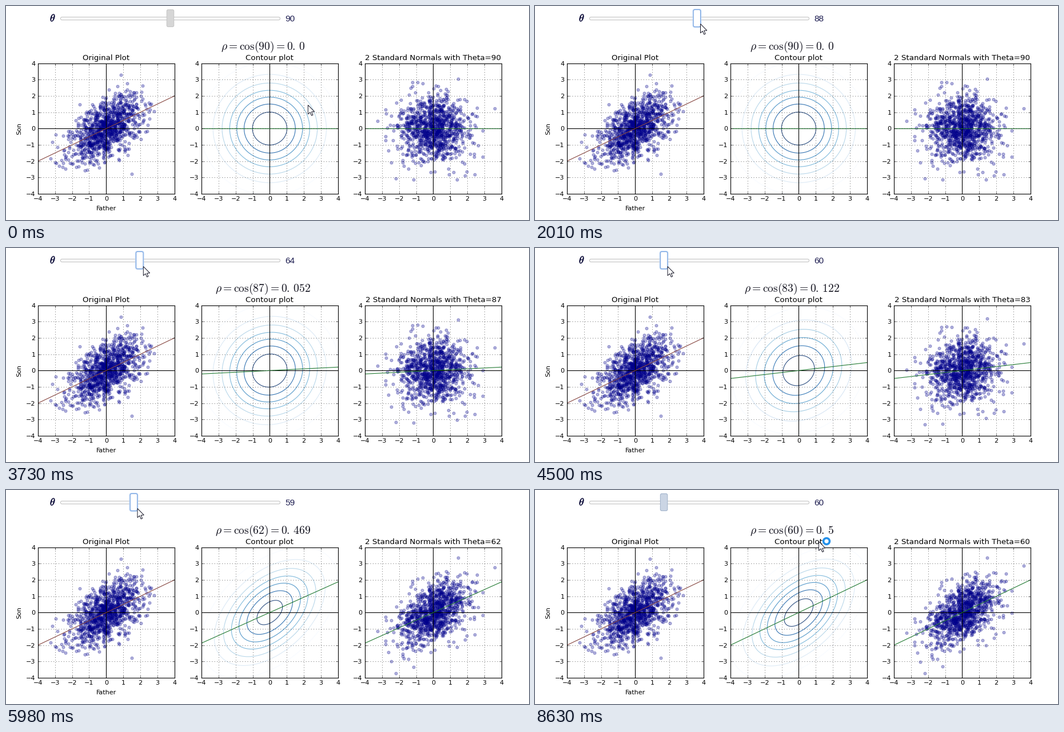
These frames come from a looping animation (915x376 px, 8.71 s). A matplotlib script:

```python
import numpy as np
import matplotlib.pyplot as plt
from matplotlib.animation import FuncAnimation
from matplotlib.patches import Circle, FancyBboxPatch, Polygon
from matplotlib.patheffects import withStroke

W, H, DPI = 915, 376, 80
STEP, FRAMES = 65, 134

# Events in ms
HOVER, GRAB, DRAG, NUDGE, RELEASE = 1150, 2010, 2250, 7380, 7840

# The plots lag behind the slider: one redraw per REDRAW ms
ANGLES = (90, 88, 87, 83, 78, 69, 62, 61, 59, 60)
FIRST_REDRAW, REDRAW = 2840, 630

# Pointer moves as (start, end, x, y)
HOME = (538, 182)
ARRIVE = [(20, 150, 508, 157), (330, 1230, 289, 31)]
LEAVE = [(7940, 8240, 517, 61), (8410, 8630, 496, 90)]

plt.rcParams.update({
    "font.family": "DejaVu Sans", "font.size": 10, "mathtext.fontset": "cm",
    "axes.linewidth": 1, "axes.axisbelow": False, "axes.titlesize": 12,
    "axes.titlepad": 5, "savefig.dpi": DPI,
})
for axis, far in (("xtick", "top"), ("ytick", "right")):
    plt.rcParams.update({
        f"{axis}.direction": "in", f"{axis}.{far}": True,
        f"{axis}.major.size": 4, f"{axis}.major.width": 0.5,
        f"{axis}.major.pad": 4,
    })

fig = plt.figure(figsize=(W / DPI, H / DPI), dpi=DPI, facecolor="white")


def panel(column, title=""):
    x = 56 + 286.05 * column
    ax = fig.add_axes([x / W, 1 - 329.8 / H, 238.6 / W, 229 / H])
    ax.set(xlim=(-4, 4), ylim=(-4, 4), xticks=range(-4, 5), yticks=range(-4, 5))
    ax.grid(True, color="black", lw=0.5, ls=(0, (2, 6)))
    ax.axhline(0, color="black", lw=1)
    ax.axvline(0, color="black", lw=1)
    ax.set_title(title)
    return ax


def normals(seed, n=1078):
    return np.random.default_rng(seed).standard_normal((2, n))


def correlate(x, z, rho):
    return rho * x + np.sqrt(1 - rho ** 2) * z


def cloud(ax, x, y):
    return ax.plot(x, y, "o", color="darkblue", alpha=0.3, ms=20 ** 0.5, mew=1,
                   zorder=1)[0]


ends = np.array([-4, 4])
left, middle, right = panel(0, "Original Plot"), panel(1, "Contour plot"), panel(2)

x0, z0 = normals(4)
cloud(left, x0, correlate(x0, z0, 0.5))
left.plot(ends, ends / 2, color="#86453f", lw=1)

xs, zs = normals(11)
dots = cloud(right, xs, zs)
fits = [ax.plot(ends, ends * 0, color="#227a32", lw=1)[0]
        for ax in (middle, right)]
rings = [middle.plot([], [], lw=1, alpha=0.85, zorder=1.9)[0] for _ in range(8)]

# Overlay in pixels, y downwards
ui = fig.add_axes([0, 0, 1, 1], zorder=5)
ui.set(xlim=(0, W), ylim=(H, 0))
ui.axis("off")


def rounded(x, y, w, h, r, **style):
    box = FancyBboxPatch((x, y), w, h, boxstyle=f"round,pad=0,rounding_size={r}",
                         **style)
    return ui.add_patch(box)


ui.text(175.5, 359, "Father", ha="center")
ui.text(23, 215.5, "Son", ha="center", va="center", rotation=90)
heading = ui.text(449.5, 76.5, "", size=17.6, ha="center", color="#10101c")
ui.text(77, 27, r"$\theta$", size=16.2, color="#10103c",
        path_effects=[withStroke(linewidth=0.5, foreground="#10103c")])
number = ui.text(488.5, 27, "", size=13.8, family="Liberation Sans",
                 color="#1c1c50")

rounded(95.5, 19.5, 384, 5, 2.5, fc="white", ec="#c4c4c4", lw=1)
glow = rounded(0, 5.5, 14.4, 32, 3.5, fc="none", ec="#c3d9f5", lw=1.2)
handle = rounded(0, 6.5, 12.4, 30, 2.5, lw=1)

ARROW = np.array([(0, 0), (0, 16), (3.7, 12.6), (6.2, 18.4), (8.6, 17.4),
                  (6.2, 11.8), (11.3, 11.5)])
pointer = ui.add_patch(Polygon(ARROW, fc="white", ec="#181828", lw=0.9, zorder=8))
busy = ui.add_patch(Circle((0, 0), 5.4, fc="white", ec="#2490ea", lw=3.2,
                           zorder=7))


def slider_value(t):
    if t < GRAB:
        return 90
    if t >= NUDGE:
        return 60
    slide = 58.1 + 29.9 * np.exp(-max(t - DRAG, 0) / 900)
    return max(59, round(slide))


def plotted_angle(t):
    k = (t - FIRST_REDRAW) // REDRAW + 1
    return ANGLES[min(max(k, 0), len(ANGLES) - 1)]


def travel(pos, moves, t):
    pos = np.array(pos, float)
    for start, end, *goal in moves:
        pos += np.clip((t - start) / (end - start), 0, 1) * (goal - pos)
    return pos


def draw_contours(rho):
    # Evenly spaced levels of a normal density with sigma 2
    peak = 1 / (8 * np.pi * np.sqrt(1 - rho ** 2))
    gap = 0.005 if peak < 0.04 else 0.006
    count = int(peak / gap)
    a = np.linspace(0, 2 * np.pi, 181)
    for k, ring in enumerate(rings):
        ring.set_visible(k < count)
        if k < count:
            r = np.sqrt(8 * np.log(peak / (gap * (k + 1))))
            ring.set_data(r * np.cos(a), r * correlate(np.cos(a), np.sin(a), rho))
            ring.set_color(plt.cm.Blues(k / (count - 1)))


def draw_plots(theta):
    rho = np.cos(np.radians(theta))
    decimals = str(round(rho, 3))[2:]
    heading.set_text(rf"$\rho=\cos({theta})=0.\,{decimals}$")
    right.set_title(f"2 Standard Normals with Theta={theta}")
    dots.set_ydata(correlate(xs, zs, rho))
    for fit in fits:
        fit.set_ydata(ends * rho)
    draw_contours(rho)


def draw_slider(t):
    value = slider_value(t)
    centre = 287.5 + 2.065 * (value - 90)
    number.set_text(str(value))
    handle.set_x(centre - 6.2)
    glow.set_x(centre - 7.2)
    active = GRAB <= t < RELEASE
    glow.set_visible(active)
    if active:
        fill, edge = "white", "#6f9fe0"
    elif t >= HOVER:
        fill, edge = "#cbd5e4", "#a3b4cc"
    else:
        fill, edge = "#d6d6d6", "#c6c6c6"
    handle.set(facecolor=fill, edgecolor=edge)
    return centre


def draw_pointer(t, centre):
    pos = (centre + 6, 32) if t >= DRAG else travel(HOME, ARRIVE, t)
    pos = travel(pos, LEAVE, t)
    pointer.set_xy(ARROW + pos + 0.5)
    busy.set_center(pos + (14, 0))
    busy.set_visible(t >= RELEASE)


def update(i):
    t = i * STEP + STEP - 1
    draw_plots(plotted_angle(t))
    draw_pointer(t, draw_slider(t))
    return []


anim = FuncAnimation(fig, update, frames=FRAMES, interval=STEP, repeat=True,
                     repeat_delay=0, blit=False)
plt.show()
```
